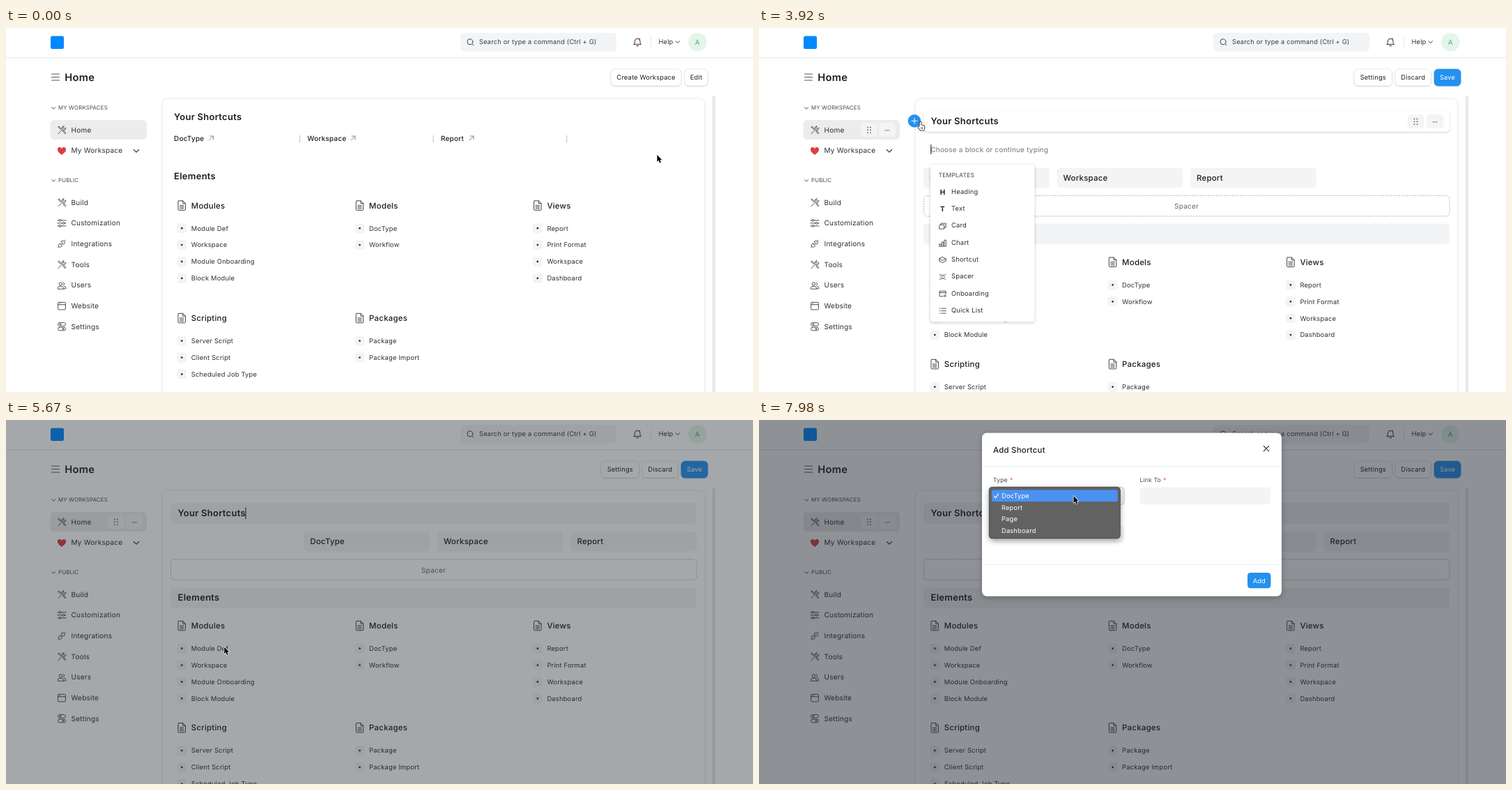
An HTML page with a canvas that plays this animation: 1072 by 522 pixels, repeating every 8000 ms.

```html
<!DOCTYPE html>
<html lang="en">
<head>
<meta charset="utf-8">
<title>Workspace editor</title>
<style>
  html, body { margin: 0; width: 100%; height: 100%; overflow: hidden; background: #fff; }
  canvas { display: block; width: 1072px; height: 522px; }
</style>
</head>
<body>
<canvas id="stage" width="1072" height="522"></canvas>
<script>
const ctx = document.getElementById('stage').getContext('2d');
const LOOP = 8000, STEP = 70, SCALE = 1072 / 1500;
const INK = '#1b1f23', BODY = '#2c3034', MUTED = '#454a4f', PALE = '#f3f4f5', BLUE = '#2490ef';

const clamp = v => Math.max(0, Math.min(1, v));
const pulse = (t, from, to, fade = 230) => clamp((t - from) / fade) * (1 - clamp((t - to) / fade));

// ---------- drawing helpers ----------
function text(str, x, y, size, color = BODY, weight = 400, align = 'left') {
  const px = size * SCALE;
  ctx.font = `${weight} ${px}px Inter, sans-serif`;
  ctx.letterSpacing = (px * 0.02).toFixed(3) + 'px';
  ctx.textRendering = 'geometricPrecision';
  ctx.textAlign = align;
  ctx.fillStyle = color;
  ctx.fillText(str, x, y + px * 0.36);
}

function box(x, y, w, h, r, fill, shadow) {
  ctx.save();
  if (shadow) {
    ctx.shadowColor = `rgba(0,0,0,${shadow[0]})`;
    ctx.shadowBlur = shadow[1];
    ctx.shadowOffsetY = shadow[2];
  }
  ctx.beginPath();
  ctx.roundRect(x, y, w, h, r);
  ctx.fillStyle = fill;
  ctx.fill();
  ctx.restore();
}

function outline(x, y, w, h, r, color, width = 1, dash = []) {
  ctx.beginPath();
  ctx.roundRect(x, y, w, h, r);
  ctx.setLineDash(dash);
  ctx.strokeStyle = color;
  ctx.lineWidth = width;
  ctx.stroke();
  ctx.setLineDash([]);
}

function path(d, x, y, stroke, width = 1, fill) {
  const p = new Path2D(d);
  ctx.save();
  ctx.translate(x, y);
  ctx.lineCap = ctx.lineJoin = 'round';
  ctx.lineWidth = width;
  if (stroke) { ctx.strokeStyle = stroke; ctx.stroke(p); }
  if (fill) { ctx.fillStyle = fill; ctx.fill(p); }
  ctx.restore();
}

function dot(x, y, r, color) {
  ctx.beginPath();
  ctx.arc(x, y, r, 0, 7);
  ctx.fillStyle = color;
  ctx.fill();
}

function button(label, x, w, primary) {
  box(x, 59, w, 24, 5.5, primary ? BLUE : '#fff', [0.16, 2, 0.7]);
  outline(x, 59, w, 24, 5.5, primary ? BLUE : 'rgba(0,0,0,.10)', 0.8);
  text(label, x + w / 2, 71, 13, primary ? '#fff' : INK, 400, 'center');
}

function handles(x, y, gap) {
  box(x, y, 24, 20, 5, '#f3f4f4');
  for (let i = 0; i < 6; i++) dot(x + 10 + i % 2 * 4, y + 6.5 + (i >> 1) * 3.8, 0.95, '#62686e');
  box(x + gap, y, 24, 20, 5, '#f3f4f4');
  for (let i = 0; i < 3; i++) dot(x + gap + 9.6 + i * 2.5, y + 10.8, 0.7, '#444');
}

const ICON = {
  tools: 'M1 11.5 6.8 5.6M7.4 6.2A3 3 0 0 0 11.6 2.6L10 4.2 8.3 3.8 7.8 2 9.4.6A3 3 0 0 0 6.4 4.6M1 2 2.3.8 5.6 4.6M1 2 4.6 5.4M7.6 7.8 10.8 11.6 11.9 10.5 8.8 7',
  sliders: 'M0 2H2M5 2H12M0 6H7M10 6H12M0 10H2M5 10H12M5 2a1.5 1.5 0 1 1-3 0a1.5 1.5 0 1 1 3 0M10 6a1.5 1.5 0 1 1-3 0a1.5 1.5 0 1 1 3 0M5 10a1.5 1.5 0 1 1-3 0a1.5 1.5 0 1 1 3 0',
  plug: 'M.5 11.5 2 10M2 10a2.6 2.6 0 0 1 0-3.6L3.2 5.2 6.8 8.8 5.6 10A2.6 2.6 0 0 1 2 10M5.2 3.2 8.8 6.8 10 5.6A2.6 2.6 0 0 0 6.4 2ZM10 2 11.5.5M4.5 6.5 5.8 5.2M5.6 7.5 6.9 6.2',
  users: 'M6.6 4a2.2 2.2 0 1 1-4.4 0a2.2 2.2 0 1 1 4.4 0M.4 11V9.8A2.6 2.6 0 0 1 3 7.6H5.8A2.6 2.6 0 0 1 8.4 9.8V11ZM8 2a2.1 2.1 0 0 1 0 4.1M9.4 7.4A2.6 2.6 0 0 1 11.8 10V11H8.4',
  window: 'M1.6.8H10.4A1 1 0 0 1 11.4 1.8V10.4A1 1 0 0 1 10.4 11.4H1.6A1 1 0 0 1 .6 10.4V1.8A1 1 0 0 1 1.6.8M.6 4.2H11.4M2.4 2.5H2.6M4.2 2.5H4.4',
  toggles: 'M2.8.4H9.2A2.3 2.3 0 0 1 9.2 5H2.8A2.3 2.3 0 0 1 2.8.4M2.8 7H9.2A2.3 2.3 0 0 1 9.2 11.6H2.8A2.3 2.3 0 0 1 2.8 7M5 2.7a1 1 0 1 1-2 0a1 1 0 1 1 2 0M9 9.3a1 1 0 1 1-2 0a1 1 0 1 1 2 0',
  heart: 'M6 11.4C2.5 9 0 6.7 0 4A3.1 3.1 0 0 1 6 2.6 3.1 3.1 0 0 1 12 4C12 6.7 9.5 9 6 11.4',
  file: 'M1.6 0H7.2L11 3.8V12.4A1.1 1.1 0 0 1 9.9 13.5H1.6A1.1 1.1 0 0 1 .5 12.4V1.1A1.1 1.1 0 0 1 1.6 0M7.2 0V3.8H11M3 6.6H8.4M3 8.8H8.4M3 11H8.4',
  bell: 'M0 9.4H10.4C9.2 8.4 9 7.4 9 5A3.8 3.8 0 0 0 1.4 5C1.4 7.4 1.2 8.4 0 9.4M3.8 11.6H6.6',
};

// ---------- page parts ----------
function navbar() {
  box(0, 42, 1072, 1, 0, '#e9ebec');
  box(0, 43, 1072, 1, 0, '#f7f7f8');
  box(64, 11.5, 19, 18.5, 2.5, '#0089ff');
  box(652, 7, 224, 26.5, 5.5, PALE);
  path('M8 4a4 4 0 1 1-8 0a4 4 0 1 1 8 0M7 7 9.2 9.2', 662, 15.8, '#3a4045');
  text('Search or type a command (Ctrl + G)', 679, 20, 13, '#383d42');
  path(ICON.bell, 901, 14, '#2b2b2b');
  dot(909, 15.8, 1.3, '#e24c4c');
  box(925, 12, 1, 17, 0, '#e6e9eb');
  text('Help', 936.5, 20, 13);
  path('M0 0 2.8 2.7 5.6 0', 961, 18.8, '#333');
  dot(992.3, 20.3, 13.2, '#e4f5e9');
  text('A', 992.3, 20.4, 14, '#55a37a', 400, 'center');
}

function sidebar(editing) {
  path('M0 0H11M0 4.5H11M0 9H11', 65.5, 66, '#555b61', 1.1);
  text('Home', 84.3, 70.3, 20.6, INK, 600);
  [['MY WORKSPACES', 114.5], ['PUBLIC', 218.5]].forEach(([label, y]) => {
    path('M0 0 2.5 2.5 5 0', 65.7, y - 0.8, MUTED);
    text(label, 75, y, 11, MUTED);
  });
  box(63.5, 132, 138.5, 28, 5.5, '#ebecec');
  if (editing) handles(146, 136, 26);
  const items = [
    ['Home', 'tools', 146], ['My Workspace', 'heart', 175.7],
    ...[['Build', 'tools'], ['Customization', 'sliders'], ['Integrations', 'plug'], ['Tools', 'tools'],
      ['Users', 'users'], ['Website', 'window'], ['Settings', 'toggles']].map((item, i) => [...item, 250 + i * 29.67]),
  ];
  for (const [label, icon, y] of items) {
    if (icon === 'heart') path(ICON.heart, 74, y - 5.2, null, 1, '#df3e3e');
    else path(ICON[icon], 74, y - 5.8, '#3b4045', 0.9);
    text(label, 93.5, y, 14.1, BODY);
  }
  path('M0 0 3.7 3.7 7.4 0', 183.3, 174.5, '#333', 1.1);
}

const COLUMNS = [246, 501.3, 756.6];
const CARDS = [
  [0, 0, 'Modules', 'Module Def', 'Workspace', 'Module Onboarding', 'Block Module'],
  [1, 0, 'Models', 'DocType', 'Workflow'],
  [2, 0, 'Views', 'Report', 'Print Format', 'Workspace', 'Dashboard'],
  [0, 1, 'Scripting', 'Server Script', 'Client Script', 'Scheduled Job Type'],
  [1, 1, 'Packages', 'Package', 'Package Import'],
];

function cards(top, rowGap) {
  for (const [col, row, title, ...links] of CARDS) {
    const x = COLUMNS[col], y = top + row * rowGap;
    path(ICON.file, x + 0.5, y - 6.7, '#363b40', 0.95);
    text(title, x + 19.8, y, 16, INK, 500);
    links.forEach((label, i) => {
      const ly = y + 32.7 + i * 23.9;
      box(x - 0.7, ly - 7, 14, 14, 4, PALE);
      dot(x + 6.3, ly, 1.4, '#2f3439');
      text(label, x + 19.8, ly, 13.1, BODY);
    });
  }
}

const SHORTCUTS = ['DocType', 'Workspace', 'Report'];

function viewContent() {
  button('Create Workspace', 868, 101);
  button('Edit', 974, 33);
  text('Your Shortcuts', 241, 127, 18.2, INK, 600);
  SHORTCUTS.forEach((label, i) => {
    const x = 241 + i * 191.5;
    text(label, x, 158.5, 14, INK, 500);
    path('M0 6 6 0M1 0H6V5', x + [50.5, 62.5, 41][i], 155, '#7c838a', 0.9);
    box(x + 180.2, 154, 1, 10.5, 0, '#b9bec3');
  });
  text('Elements', 241, 212.5, 18.2, INK, 600);
  cards(254.5, 161.5);
}

function editContent(t) {
  const hovered = (t >= 1890 && t < 2060) || (t >= 2870 && t < 4480);
  const tools = Math.max(pulse(t, 1890, 2060), pulse(t, 2870, 4480));
  const choosing = t >= 3920 && t < 5600, added = t >= 5600;
  const dy = choosing ? 40.7 : 0;

  button('Settings', 854, 54.5);
  button('Discard', 913, 51.5);
  button('Save', 969, 38, true);

  box(236, 119, 755, 29.7, 5, hovered ? '#fff' : PALE, hovered && [0.2, 3, 1]);
  text('Your Shortcuts', 246.5, 133.7, 18.2, INK, 600);
  ctx.globalAlpha = tools;
  handles(930.5, 124, 27.5);
  dot(223, 133.3, 9.2, BLUE);
  path('M0 4H8M4 0V8', 219, 129.3, '#fff', 1);
  ctx.globalAlpha = 1;

  SHORTCUTS.forEach((label, i) => {
    const x = 236 + (i + added) * 191.5;
    box(x, 159.7 + dy, 180.7, 28.8, 5, PALE);
    text(label, x + 9, 174.2 + dy, 16, INK, 500);
  });
  outline(236.5, 199.7 + dy, 754.5, 29.5, 5, '#a9afb5', 0.9, [2.2, 1.6]);
  text('Spacer', 613.5, 215 + dy, 14, '#62686e', 400, 'center');
  box(236, 240 + dy, 755, 29.5, 5, PALE);
  text('Elements', 246.5, 254.5 + dy, 18.2, INK, 600);
  cards(295 + dy, 146.3);

  if (choosing) blockMenu(t);
  if (added && t < 5810) box(343.5, 125.5, 1, 16.5, 0, '#111');
}

const BLOCKS = [
  ['Heading', 'H'], ['Text', 'T'],
  ['Card', 'M1.5 3H7V9H0V4.5A1.5 1.5 0 0 1 1.5 3M2.5 2.8V1H9.5V7H7.2'],
  ['Chart', 'M0 9.5V6.5H2.4V9.5ZM3.6 9.5V3.5H6V9.5ZM7.2 9.5V.8H9.6V9.5Z'],
  ['Shortcut', 'M4.8.8 9.4 3.2 4.8 5.6.2 3.2ZM.2 6.4 4.8 9 9.4 6.4M.2 3.2V6.4M9.4 3.2V6.4'],
  ['Spacer', 'M.5 1 2 2.6H7.6L9.2 1M.5 9 2 7.4H7.6L9.2 9M1.4 5H2.6M4.2 5H5.4M7 5H8.2'],
  ['Onboarding', 'M5.5 8.6H.4V1H9.4V5M.4 3.2H9.4M9.4 7.8a1.3 1.3 0 1 1-2.6 0a1.3 1.3 0 1 1 2.6 0'],
  ['Quick List', 'M.4 1.5H1.2M3 1.5H9.6M.4 5H1.2M3 5H9.6M.4 8.5H1.2M3 8.5H9.6'],
];

function blockMenu(t) {
  text('Choose a block or continue typing', 246.3, 174.3, 14, '#70767c');
  if (t < 4450 || (t >= 4980 && t < 5460)) box(246.3, 167, 1, 14, 0, '#111');
  box(246, 196, 149.5, 225.5, 4, '#fff', [0.22, 4, 1]);
  text('TEMPLATES', 257.5, 210.5, 12, MUTED);
  BLOCKS.forEach(([label, icon], i) => {
    const y = 234.5 + i * 24.3;
    if (icon.length === 1) text(icon, 263.5, y + 0.8, 14, '#222', 700, 'center');
    else path(icon, 258.7, y - 4, '#3b4045', 0.9);
    text(label, 276, y, 13.1, BODY);
  });
}

function dialog(t) {
  const shown = clamp((t - 5740) / 210);
  if (!shown) return;
  const open = t >= 6860;
  ctx.save();
  ctx.globalAlpha = shown;
  ctx.translate(0, -36 * (1 - shown) ** 2);
  box(320, 18.5, 430, 234.3, 7, '#fff', [0.25, 8, 2]);
  text('Add Shortcut', 336, 42.5, 16, INK, 500);
  path('M0 0 7.4 7.4M7.4 0 0 7.4', 724.3, 37.3, '#222', 1.2);
  box(320, 66, 430, 1, 0, '#eceeef');
  if (t >= 6090) box(320, 207, 430, 1, 0, '#eceeef');
  [['Type', 336, 85.5, 360], ['Link To', 546.5, 85.5, 580], ['Label', 336, 140.7]].forEach(([label, x, y, star]) => {
    text(label, x, y, 12, MUTED);
    if (star) text('*', star, y + 0.5, 12, '#e24c4c');
    box(x, y + 11, 187.7, 24.8, 5, PALE);
  });
  if (open) outline(336, 96.2, 188, 25.3, 5, '#c9cdd0', 1.2);
  path('M0 2.4 2.4 0 4.8 2.4M0 7.6 2.4 10 4.8 7.6', 506.7, 104.2, '#333', 1);
  box(701, 219, 33.5, 22.3, 4.5, BLUE);
  text('Add', 717.8, 230.3, 13, '#fff', 400, 'center');
  if (open) typeMenu(t);
  ctx.restore();
}

function typeMenu(t) {
  box(330, 96, 188.5, 74, 4.5, '#626263', [0.35, 8, 3]);
  outline(330.3, 96.3, 188, 73.5, 4.5, '#48494b', 0.8);
  const blinkOff = t >= 7910 && t < 7980;
  if (!blinkOff) box(334, 100.3, 180.7, 16.7, 2.5, '#4b91f1');
  path('M0 3.4 2.2 6 6 0', 337.5, 105.8, '#fff', 1.2);
  ['DocType', 'Report', 'Page', 'Dashboard'].forEach((label, i) => text(label, 348, 109 + i * 16.4, 13, '#fff'));
}

// ---------- pointer ----------
const TRACK = [ // time, x, y
  [70, 934.4, 182], [770, 992, 70], [1540, 992, 70], [1960, 494.5, 145], [2400, 290, 184],
  [3290, 231.6, 134.6], [4270, 231.6, 134.6], [5250, 313.3, 325.5], [5740, 313.3, 325.5],
  [6020, 370, 277], [6370, 429, 118], [6580, 441, 103], [7350, 441, 103], [7700, 451.5, 109],
];

function slope(i, axis) {
  if (i < 1 || i > TRACK.length - 2) return 0;
  const [a, b, c] = TRACK.slice(i - 1, i + 2);
  const before = (b[axis] - a[axis]) / (b[0] - a[0]), after = (c[axis] - b[axis]) / (c[0] - b[0]);
  return before * after > 0 ? 2 * before * after / (before + after) : 0;
}

// Monotone cubic through the track points, so rests stay still.
function along(t, axis) {
  const next = TRACK.findIndex(k => k[0] > t);
  if (next < 1) return TRACK.at(next)[axis];
  const a = TRACK[next - 1], b = TRACK[next], span = b[0] - a[0], u = (t - a[0]) / span;
  const blend = u * u * (3 - 2 * u);
  return a[axis] + (b[axis] - a[axis]) * blend
    + span * u * (1 - u) * ((1 - u) * slope(next - 1, axis) - u * slope(next, axis));
}

function pointer(t) {
  const x = along(t, 1), y = along(t, 2), editing = t >= 1190 && t < 5600;
  const onButton = t < 5600 && y < 84 && x > 968;
  const onPlus = editing && Math.hypot(x - 223, y - 133) < 12;
  const onMenu = editing && t >= 3920 && x > 246 && y > 225;
  if (onButton || onPlus || onMenu) {
    path('M2.6 7.4V1.5a1 1 0 0 1 2 0V5.2L8.4 6A1.3 1.3 0 0 1 9.4 7.3V9.6L8.5 12.6H3.8L.6 8.6A.9.9 0 0 1 2 7.4Z', x - 3.6, y - 0.5, '#111', 1.6, '#fff');
    path('M4.8 8.4V10.6M6.6 8.4V10.6', x - 3.6, y - 0.5, '#111', 0.7);
  } else if (editing && y > 119 && y < 149 && x > 240) {
    path('M-2.8-6.3Q0-6.3 0-4.8Q0-6.3 2.8-6.3M0-5V5M-2.8 6.3Q0 6.3 0 4.8Q0 6.3 2.8 6.3M-1.2 1.6H1.2', x, y, '#222', 1);
  } else {
    path('M0 0V9.8L2.3 7.8 3.8 11.4 5.5 10.7 4 7.2H7Z', x, y, '#fff', 1.4, '#000');
  }
}

function draw(t) {
  const editing = t >= 1190;
  ctx.fillStyle = '#fff';
  ctx.fillRect(0, 0, 1072, 522);
  navbar();
  sidebar(editing);
  box(225, 102, 777, 440, 7, '#fff', [0.15, 4, 0.3]);
  box(1013.5, 98, 4.7, 424, 0, '#e8e9e9');
  if (editing) editContent(t);
  else viewContent();
  ctx.fillStyle = `rgba(31,39,46,${0.5 * clamp((t - 5550) / 150)})`;
  ctx.fillRect(0, 0, 1072, 522);
  dialog(t);
  pointer(t);
}

const start = performance.now();
function tick() {
  const t = (performance.now() - start) % LOOP;
  draw(Math.floor(t / STEP) * STEP);
  requestAnimationFrame(tick);
}
tick();
</script>
</body>
</html>
```
